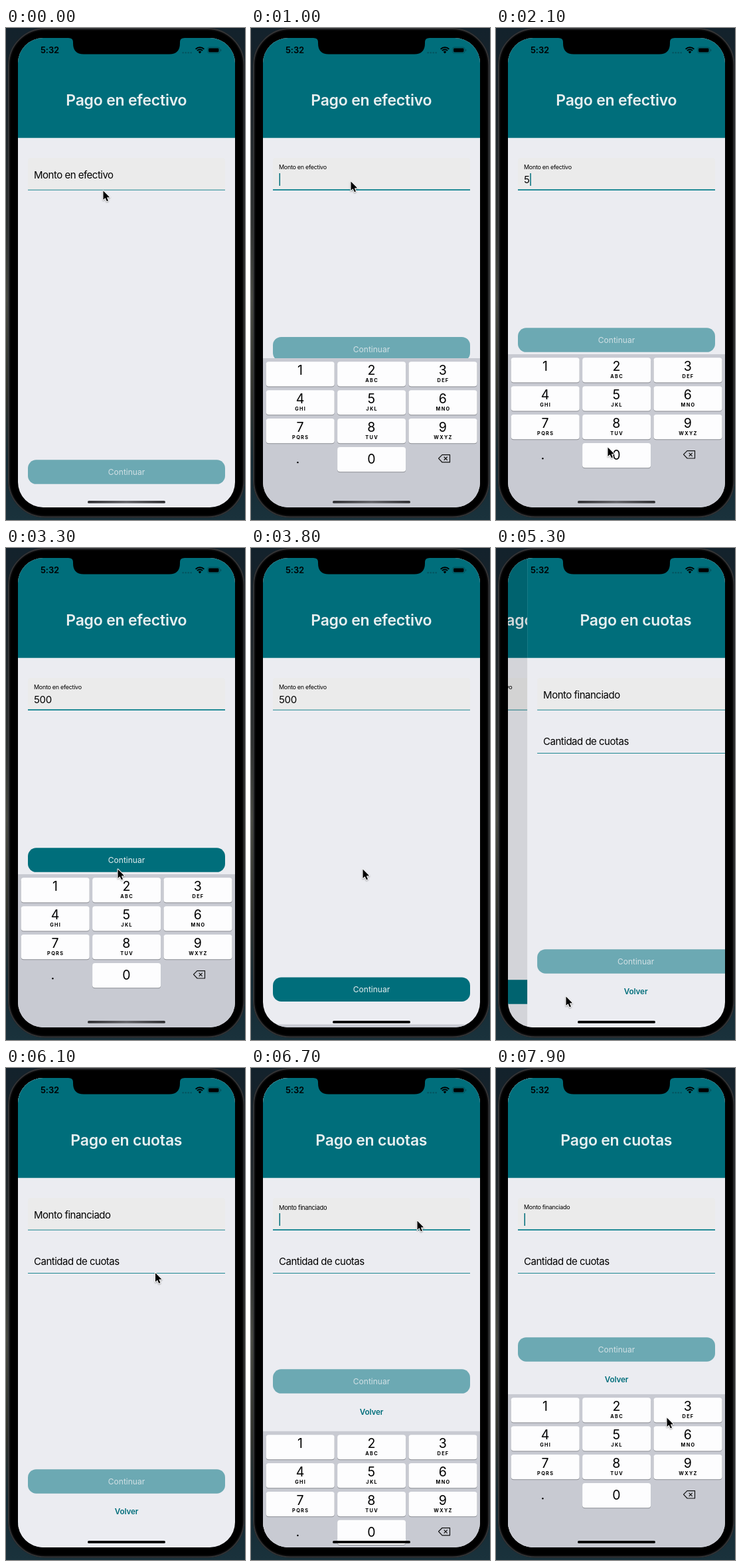
Recreate the animation shown at these times as an HTML page with a canvas. Size 360x742 px, loop 8 s.

```html
<!DOCTYPE html>
<html lang="es">
<head>
<meta charset="utf-8">
<style>
html, body { margin: 0; width: 100%; height: 100%; overflow: hidden; background: #000; }
canvas { display: block; }
</style>
</head>
<body>
<canvas id="stage" width="360" height="742"></canvas>
<script>
const ctx = document.getElementById('stage').getContext('2d');
const LOOP = 8000;
const TEAL = '#006e7b', TEAL_OFF = '#6ca9b3', PAGE = '#ebecf1', FIELD = '#ebebeb';
const SCREEN = { x: 18, y: 15, w: 327, h: 708, r: 38 };
const KEYBOARD_HEIGHT = 231, BUTTON_LIFT = 199;

// Times of the user's actions
const FOCUS_1 = 690, BLUR_1 = 3480, PUSH = 5080, FOCUS_2 = 6545;
const TYPED = [1900, 2330, 2600];

const POINTER = [
  [0, 146.5, 245], [280, 146.5, 245], [600, 150.5, 231], [1150, 150.5, 231],
  [1650, 177, 553], [1900, 177, 553], [2090, 168.5, 632], [2700, 168.5, 632],
  [3250, 168.5, 484], [3850, 168.5, 484], [4420, 108, 664], [4580, 108, 664],
  [4850, 105.5, 676], [5500, 105.5, 676], [6320, 250.5, 230], [7320, 250.5, 230],
  [7880, 257.5, 527], [8000, 257.5, 527]
];

const clamp = v => Math.max(0, Math.min(1, v));
const smooth = v => v * v * (3 - 2 * v);

// Critically damped spring going from 0 to 1
function spring(ms) {
  const a = 0.01826 * Math.max(0, ms);
  return 1 - (1 + a) * Math.exp(-a);
}

function box(x, y, w, h, r, fill) {
  ctx.beginPath();
  ctx.roundRect(x, y, w, h, r);
  ctx.fillStyle = fill;
  ctx.fill();
}

function text(str, x, y, size, { color = '#000', weight = 400, align = 'left', spacing = 0 } = {}) {
  ctx.font = `${weight} ${size}px Inter, sans-serif`;
  ctx.letterSpacing = `${spacing}px`;
  ctx.textAlign = align;
  ctx.fillStyle = color;
  ctx.fillText(str, x, y + size * 0.36);
}

function line(points, width, color) {
  ctx.beginPath();
  points.forEach(p => ctx.lineTo(...p));
  ctx.lineWidth = width;
  ctx.strokeStyle = color;
  ctx.stroke();
}

function field(label, bottom, { raised = 0, value = '', caret = false, focused = false, filled = true } = {}) {
  const middle = bottom - (filled ? 22.5 : 18.2);
  if (filled) box(33, bottom - 48.5, 297, 48.5, [4, 4, 0, 0], FIELD);
  if (focused) box(33, bottom - 1.3, 297, 1.8, 0, '#087f8c');
  else box(33, bottom - 0.8, 297, 1.1, 0, '#1d8792');
  const size = 15 - 6 * raised;
  text(label, 42, middle - 12 * raised, size, { spacing: -size / 30 });
  text(value, 42, middle + 6.5, 15, { spacing: -0.3 });
  if (caret) box(42.5 + value.length * 8.8, middle - 3, 1.5, 19, 0, TEAL);
}

function button(y, enabled) {
  box(33, y, 297, 36.5, 12.5, enabled ? TEAL : TEAL_OFF);
  text('Continuar', 181.5, y + 18.3, 12, { color: enabled ? '#e6eef0' : '#d2e0e5', align: 'center' });
}

function page(x, title, body) {
  ctx.save();
  ctx.translate(x, 0);
  box(18, 0, 327, 742, 0, PAGE);
  box(18, 0, 327, 165.7, 0, TEAL);
  text(title, 181.3, 108.5, 23, { color: '#e8eff0', weight: 600, align: 'center', spacing: -0.22 });
  body();
  ctx.restore();
}

const blinkOn = ms => ms >= 0 && ms % 1000 < 600;

function cashPage(t) {
  const focused = t >= FOCUS_1 && t < BLUR_1;
  const count = TYPED.filter(at => t >= at).length;
  const lastEdit = count ? TYPED[count - 1] : FOCUS_1;
  field('Monto en efectivo', 244.5, {
    raised: smooth(clamp((t - FOCUS_1) / 185)),
    value: '500'.slice(0, count),
    caret: focused && blinkOn(t - lastEdit),
    focused
  });
  button(651.3 - BUTTON_LIFT * (spring(t - 762) - spring(t - BLUR_1)), count === 3);
}

function instalmentPage(t) {
  const focused = t >= FOCUS_2;
  field('Monto financiado', 244.5, {
    raised: smooth(clamp((t - FOCUS_2) / 185)),
    caret: focused && blinkOn(t - FOCUS_2),
    focused
  });
  field('Cantidad de cuotas', 309.8, { filled: false });
  const y = 605.2 - BUTTON_LIFT * spring(t - FOCUS_2 - 6);
  button(y, false);
  text('Volver', 181.5, y + 64, 11.7, { color: TEAL, weight: 600, align: 'center', spacing: -0.1 });
}

function keyboard(y) {
  box(18, y, 327, KEYBOARD_HEIGHT + 20, 0, '#c8cad2');
  const letters = ['', 'ABC', 'DEF', 'GHI', 'JKL', 'MNO', 'PQRS', 'TUV', 'WXYZ'];
  const key = (label, sub, col, row, dy) => {
    const kx = 22.7 + col * 107.4, ky = y + 5.3 + row * 42.9;
    box(kx, ky + 1, 103, 37.2, 4, '#898b91');
    box(kx, ky, 103, 37.2, 4, '#fdfdfe');
    text(label, kx + 51.3, ky + dy, 19.5, { align: 'center' });
    text(sub, kx + 52, ky + 28.5, 7.3, { weight: 700, align: 'center', spacing: 1.3 });
  };
  letters.forEach((sub, i) => key(String(i + 1), sub, i % 3, Math.floor(i / 3), 13));
  key('0', '', 1, 3, 18.3);
  box(69.2, y + 156, 2.4, 2.4, 1.2, '#000');

  ctx.save();
  ctx.translate(282, y + 145.2);
  ctx.lineJoin = 'round';
  line([[0.5, 6], [6, 0.5], [17.5, 0.5], [17.5, 11.8], [6, 11.8], [0.5, 6], [6, 0.5]], 1.2, '#111');
  line([[8.7, 3.6], [13.7, 8.6]], 1.2, '#111');
  line([[13.7, 3.6], [8.7, 8.6]], 1.2, '#111');
  ctx.restore();
}

function statusBar() {
  text('5:32', 52, 33.7, 13, { weight: 600, spacing: -0.1 });
  for (let i = 0; i < 4; i++) box(265.5 + i * 4, 36, 2.4, 2.4, 1.2, '#045560');
  [9, 5.8].forEach(r => {
    ctx.beginPath();
    ctx.arc(292, 38.3, r, -Math.PI * 0.75, -Math.PI * 0.25);
    ctx.lineWidth = 1.9;
    ctx.strokeStyle = '#000';
    ctx.stroke();
  });
  ctx.beginPath();
  ctx.moveTo(292, 38.5);
  ctx.arc(292, 38.3, 3.3, -Math.PI * 0.75, -Math.PI * 0.25);
  ctx.fillStyle = '#000';
  ctx.fill();
  ctx.beginPath();
  ctx.roundRect(303.5, 29, 18.5, 9, 2.8);
  ctx.lineWidth = 0.9;
  ctx.strokeStyle = '#04505a';
  ctx.stroke();
  box(305, 30.5, 15.5, 6, 1.4, '#000');
  box(323, 32, 1.2, 3, 0.6, '#04505a');
}

function notch() {
  ctx.beginPath();
  ctx.moveTo(94, 13);
  ctx.lineTo(94, 15);
  ctx.quadraticCurveTo(101, 15, 101, 21);
  ctx.lineTo(101, 23);
  ctx.quadraticCurveTo(101, 39.5, 117, 39.5);
  ctx.lineTo(246, 39.5);
  ctx.quadraticCurveTo(262, 39.5, 262, 23);
  ctx.lineTo(262, 21);
  ctx.quadraticCurveTo(262, 15, 269, 15);
  ctx.lineTo(269, 13);
  ctx.fillStyle = '#000';
  ctx.fill();
}

function phoneBody() {
  const wall = ctx.createLinearGradient(0, 0, 0, 742);
  [[0, '#13222c'], [0.15, '#1b2329'], [0.4, '#2f3231'], [0.55, '#484a43'],
   [0.75, '#30322c'], [0.88, '#142a34'], [1, '#1a323c']].forEach(s => wall.addColorStop(...s));
  box(0, 0, 360, 742, 0, wall);
  box(3, 0, 356.5, 738.5, 56, '#0a0a0b');
  ctx.beginPath();
  ctx.roundRect(4, 1, 354.5, 736.5, 55);
  ctx.lineWidth = 2;
  ctx.strokeStyle = '#333436';
  ctx.stroke();
  box(7, 4, 348.5, 730.5, 51, '#000');
}

function homeBar(t) {
  let fill = '#000';
  if (t < BLUR_1) {
    fill = ctx.createLinearGradient(123, 0, 240, 0);
    fill.addColorStop(0, '#2e2e31');
    fill.addColorStop(0.5, '#66666b');
    fill.addColorStop(1, '#2e2e31');
  }
  box(123, 713, 117, 3.8, 1.9, fill);
}

function pointer(t) {
  const i = POINTER.findIndex(p => p[0] > t);
  const [t0, x0, y0] = POINTER[i - 1], [t1, x1, y1] = POINTER[i];
  const k = smooth((t - t0) / (t1 - t0));
  ctx.save();
  ctx.translate(x0 + (x1 - x0) * k, y0 + (y1 - y0) * k);
  ctx.beginPath();
  [[0, 0.5], [0, 14], [3.1, 11.2], [5.3, 16.3], [7.5, 15.4], [5.3, 10.4], [9.6, 10.2]]
    .forEach(p => ctx.lineTo(...p));
  ctx.closePath();
  ctx.lineJoin = 'round';
  ctx.lineWidth = 2;
  ctx.strokeStyle = '#fff';
  ctx.shadowColor = 'rgba(0,0,0,.35)';
  ctx.shadowBlur = 2;
  ctx.shadowOffsetY = 1;
  ctx.stroke();
  ctx.shadowColor = 'transparent';
  ctx.fillStyle = '#000';
  ctx.fill();
  ctx.restore();
}

function draw(t) {
  phoneBody();
  ctx.save();
  ctx.beginPath();
  ctx.roundRect(SCREEN.x, SCREEN.y, SCREEN.w, SCREEN.h, SCREEN.r);
  ctx.clip();

  const push = spring(t - PUSH);
  page(-0.3 * SCREEN.w * push, 'Pago en efectivo', () => cashPage(t));
  if (push > 0) {
    box(18, 0, 327, 742, 0, `rgba(0,0,0,${0.11 * push})`);
    page(SCREEN.w * (1 - push), 'Pago en cuotas', () => instalmentPage(t));
  }

  const shown = spring(t - 698) - spring(t - BLUR_1) + spring(t - FOCUS_2 - 6);
  if (shown > 0.001) keyboard(723 - KEYBOARD_HEIGHT * shown);
  homeBar(t);
  statusBar();
  notch();
  ctx.restore();
  pointer(t);
}

const start = performance.now();
function tick() {
  draw((performance.now() - start) % LOOP);
  requestAnimationFrame(tick);
}
tick();
</script>
</body>
</html>
```
